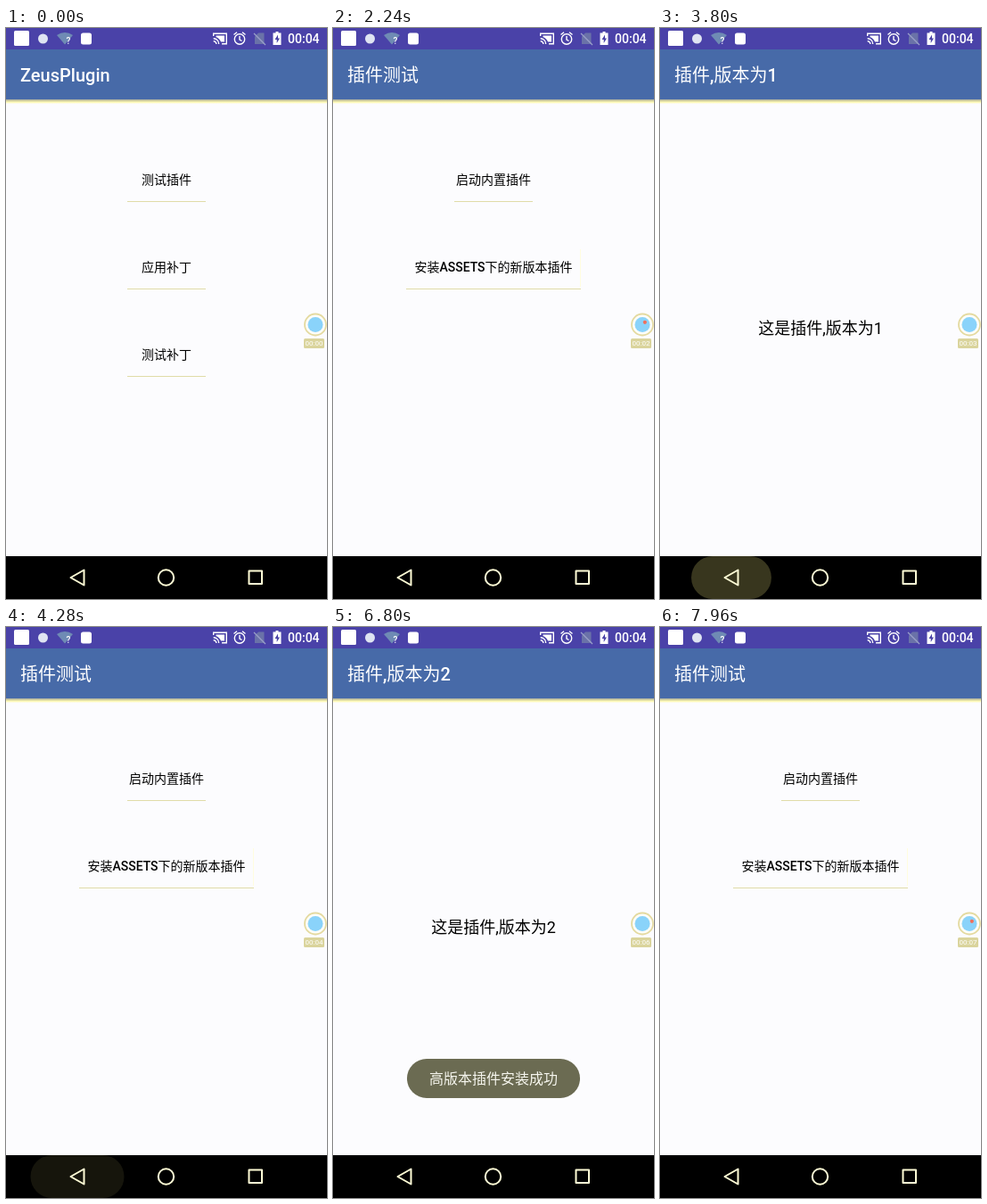
An HTML page for the animation above (8000 ms loop, 360x640 px).

```html
<!DOCTYPE html>
<html lang="zh-CN">
<head>
<meta charset="utf-8">
<title>ZeusPlugin</title>
<style>
  html, body { margin: 0; width: 100%; height: 100%; overflow: hidden; background: #000; }
  svg { display: block; width: 360px; height: 640px; }
  text { font-family: Roboto, "Noto Sans CJK SC", "Noto Sans CJK", sans-serif; }
  .mid { text-anchor: middle; }
  .med { font-weight: 500; }
</style>
</head>
<body>
<svg viewBox="0 0 360 640">
  <defs>
    <linearGradient id="shade" x1="0" y1="0" x2="0" y2="1">
      <stop offset="0" stop-color="#a3a7a2"/>
      <stop offset=".35" stop-color="#d9d6a2"/>
      <stop offset=".65" stop-color="#fffbb4"/>
      <stop offset="1" stop-color="#fcfcfe"/>
    </linearGradient>
  </defs>
  <rect width="360" height="640"/>
  <g id="windows"></g>

  <g id="toast">
    <rect x="83" y="484" width="194" height="44" rx="22" fill="#6b6b52"/>
    <text class="mid" x="180" y="512" font-size="16" fill="#f6f6ee">高版本插件安装成功</text>
  </g>

  <g id="status" fill="#fff">
    <rect x="9" y="3" width="17" height="17" rx="1.500"/>
    <circle cx="41.500" cy="12" r="5.500" fill="#dfe4f2"/>
    <path d="M57 8Q66 2 75 8L66 18.500Z" fill="#6f8bb4"/>
    <text class="med" x="67.500" y="18" font-size="10">?</text>
    <rect x="84" y="5.500" width="12" height="13" rx="2.500"/>
    <path d="M235.500 8.500H245V15.500H241Q239.500 11.500 235.500 10Z"/>
    <g fill="none" stroke="#fff" stroke-width="1.400">
      <path d="M232.700 9V6.200H247.300V17.800H242M232.700 11.800A6 6 0 0 1 238.700 18M232.700 14.800A3.200 3.200 0 0 1 235.900 18"/>
      <circle cx="262" cy="12.500" r="5.700"/>
      <path d="M262 9V13L264.500 14.500M255.500 7.500L259 4.700M268.500 7.500L265 4.700"/>
    </g>
    <path d="M283 5.500H289.500V18H279V9.500Z" fill="#6a72a8"/>
    <path d="M278 6L291 19" stroke="#9aa0c8" stroke-width="1.300"/>
    <path d="M302.500 4H305.500V5.500H308.500V19H299.500V5.500H302.500Z"/>
    <path d="M305 7.500L301.500 13H303.700V17L307 11.500H305Z" fill="#4a42a6"/>
    <text class="med" x="316" y="17" font-size="14">00:04</text>
  </g>

  <rect id="navGlow" y="592" height="48" rx="24" fill="#fff38a"/>
  <g fill="none" stroke="#fffdd6" stroke-width="2" stroke-linejoin="round">
    <path d="M87.500 607.500V624.500L72.500 616Z"/>
    <circle cx="179.500" cy="616" r="8.700"/>
    <rect x="272.500" y="608.500" width="14.500" height="14.500"/>
  </g>

  <g id="recorder">
    <circle cx="347" cy="332.500" r="12" fill="#fdfdf8" stroke="#e4daa0" stroke-width="1.800"/>
    <circle cx="347" cy="332.500" r="8.500" fill="#8ad3fa"/>
    <circle id="dot" cx="349.800" cy="329.800" r="2.100" fill="#f0705c"/>
    <rect x="334" y="348" width="23" height="11" rx="1.500" fill="#dad49c"/>
    <text id="clock" class="mid" x="345.500" y="356.300" font-size="8" fill="#fff"></text>
  </g>
</svg>
<script>
const LOOP = 8000, SLIDE = 51.2;
const $ = id => document.getElementById(id);
const clamp = x => Math.max(0, Math.min(1, x));
const part = (t, start, length) => clamp((t - start) / length);

// Latin runs are medium weight, Chinese stays regular
const mix = s => s.replace(/[\x21-\x7e]+/g, m => `<tspan class="med">${m}</tspan>`);

function button(id, label, y, width, edge = "none") {
  const x = 180 - width / 2;
  return `<clipPath id="${id}Clip"><rect x="${x}" y="${y - 24}" width="${width}" height="48" rx="2"/></clipPath>
    <path d="M${x + width - .5} ${y - 20}V${y + 22}" stroke="${edge}"/>
    <path d="M${x} ${y + 24.5}H${x + width}" stroke="#e0dca8"/>
    <g clip-path="url(#${id}Clip)"><circle id="${id}" cx="180" cy="${y}" r="0" fill="#000"/></g>
    <text class="mid" x="180" y="${y + 5}" font-size="14">${mix(label)}</text>`;
}

const message = s => `<text class="mid" x="180" y="343" font-size="18">${s}</text>`;

function makeWindow(title, body) {
  const g = document.createElementNS("http://www.w3.org/2000/svg", "g");
  g.innerHTML = `<rect width="360" height="640" fill="#fcfcfe"/>
    <rect width="360" height="24" fill="#4a42a8"/>
    <rect y="24" width="360" height="56" fill="#476aa8"/>
    <rect y="80" width="360" height="5" fill="url(#shade)"/>
    <rect y="592" width="360" height="48"/>
    <text x="16" y="59.500" font-size="20" fill="#fff">${mix(title)}</text>${body}`;
  $("windows").append(g);
  return g;
}

const windows = [
  makeWindow("ZeusPlugin", button("tryPlugin", "测试插件", 170, 88) +
    button("applyPatch", "应用补丁", 268, 88) + button("tryPatch", "测试补丁", 366, 88)),
  makeWindow("插件测试", button("launch", "启动内置插件", 170, 88) +
    button("install", "安装ASSETS下的新版本插件", 268, 196, "#fffde0")),
  makeWindow("插件,版本为1", message("这是插件,版本为1")),
  makeWindow("插件,版本为2", message("这是插件,版本为2"))
];

// [start, window below, window above, opening]
const moves = [
  [913, 0, 1, true],
  [2460, 1, 2, true],
  [3860, 1, 2, false],
  [6480, 1, 3, true],
  [7340, 1, 3, false]
];
const taps = { tryPlugin: [720], launch: [2240, 6120], install: [4800] };
const backTaps = [3680, 7160];
const dots = [0, 1, 1, 0, 0, 1, 0, 1];

function place(i, alpha, y) {
  const w = windows[i];
  w.style.display = alpha > 0 ? "" : "none";
  w.setAttribute("opacity", alpha);
  w.setAttribute("transform", `translate(0 ${Math.round(y)})`);
}

function drawWindows(t) {
  windows.forEach((w, i) => place(i, 0, 0));
  const move = moves.filter(m => m[0] <= t).pop();
  if (!move) return place(0, 1, 0);
  const [start, low, high, opening] = move;
  if (opening) {
    const p = part(t, start, 350);
    place(low, p < 1 ? 1 - .3 * part(t, start, 217) : 0, 0);
    place(high, 1 - (1 - part(t, start, 150)) ** 4, SLIDE * (1 - p) ** 5);
  } else {
    place(low, .7 + .3 * part(t, start, 250), 0);
    place(high, 1 - part(t, start + 100, 150), SLIDE * part(t, start, 250) ** 4);
  }
}

function drawTaps(t) {
  for (const id in taps) {
    const start = taps[id].filter(s => s <= t).pop() ?? -LOOP;
    $(id).setAttribute("r", 105 * (1 - (1 - part(t, start, 350)) ** 2));
    $(id).setAttribute("opacity", .1 * (1 - part(t, start + 200, 350)));
  }
  const start = backTaps.filter(s => s <= t).pop() ?? -LOOP;
  const width = 48 + 57 * (1 - (1 - part(t, start, 250)) ** 2);
  const glow = $("navGlow");
  glow.setAttribute("x", 80 - width / 2);
  glow.setAttribute("width", width);
  glow.setAttribute("opacity", .22 * part(t, start, 100) * (1 - part(t, start + 350, 410)));
}

function draw(t) {
  drawWindows(t);
  drawTaps(t);
  $("toast").setAttribute("opacity", part(t, 5060, 400) * (1 - part(t, 6960, 400)));
  const second = Math.min(7, Math.floor((t + 80) / 1000));
  $("clock").textContent = "00:0" + second;
  $("dot").setAttribute("opacity", dots[second]);
}

function tick() {
  draw(performance.now() % LOOP);
  requestAnimationFrame(tick);
}
tick();
</script>
</body>
</html>
```
